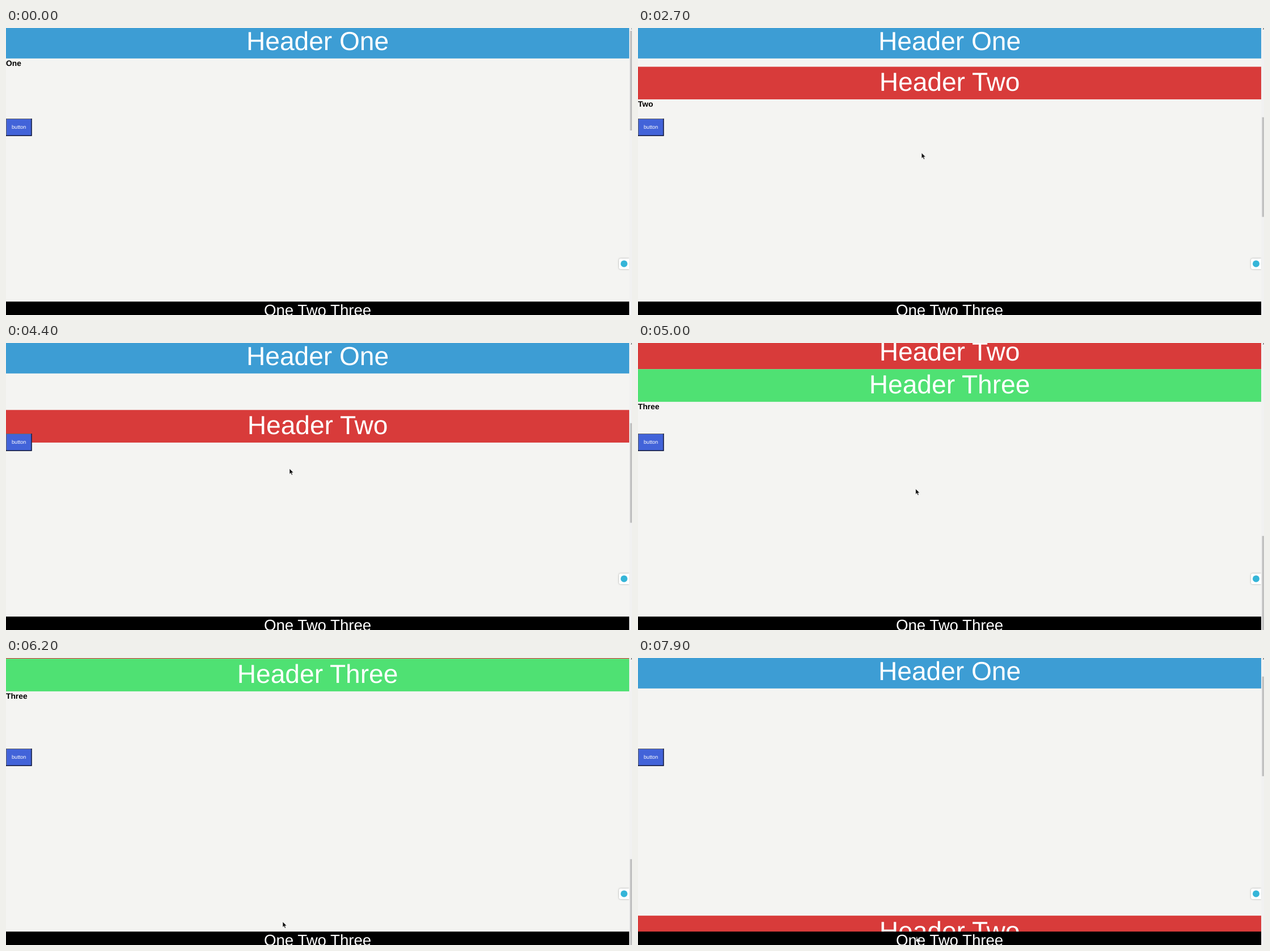
An HTML page for the animation above (8 s loop, 1104 by 507 pixels).

```html
<!DOCTYPE html>
<html lang="en">
<head>
<meta charset="utf-8">
<title>Sticky headers</title>
<style>
  html, body { margin: 0; width: 100%; height: 100%; overflow: hidden; background: #f4f4f2; }
  svg { display: block; width: 100%; height: 100%; }
  text { font-family: "Liberation Sans", Arial, sans-serif; text-rendering: geometricPrecision; }
  .head text { font-size: 46.1px; fill: #fff; text-anchor: middle; }
  .label { font-size: 13.8px; font-weight: bold; }
  #foot { font-size: 27.6px; fill: #fff; text-anchor: middle; }
  #widget { filter: drop-shadow(0 0 1.5px #0005); }
</style>
</head>
<body>
<svg viewBox="0 0 1104 507">
  <rect width="1104" height="507" fill="#f4f4f2"/>
  <g id="labels"></g>
  <g id="heads"></g>

  <g id="button">
    <rect y="160" width="45.6" height="30.8" fill="#4263d9"/>
    <path d="M.5 190.8V160.5H45.6" fill="none" stroke="#68686c" stroke-width="1.1"/>
    <path d="M0 190.2H45V160" fill="none" stroke="#0b0b18" stroke-width="1.2"/>
    <text x="22.7" y="178.2" font-size="9.2" fill="#fff" text-anchor="middle">button</text>
  </g>

  <path id="widget" d="M1099 407.3H1084a3 3 0 0 0-3 3V423a3 3 0 0 0 3 3H1099Z" fill="#fff"/>
  <circle cx="1090" cy="416.5" r="6" fill="#35b5d8"/>

  <rect y="483.3" width="1099.2" height="24" fill="#000"/>
  <text id="foot" x="549.6" y="508.3">One Two Three</text>

  <rect x="1099.2" width="5" height="507" fill="#f1f1f1"/>
  <rect id="thumb" x="1100.5" width="3.5" height="176" fill="#c1c1c1"/>
  <path id="arrow" d="M1101.5 2.3L1104 0V2.3Z"/>

  <path id="pointer" d="M0 0V9.5L2.2 7.6 3.8 11.2 5.4 10.5 3.9 7H7Z" fill="#111" stroke="#fff" stroke-width=".5"/>
  <path id="hand" d="M-.8 .4Q0-.6 .8 .4V3.6L5 4.3Q6 4.6 5.8 6L5 9.5H.6L-2.8 5.6Q-2.6 4.4-.8 5.4Z" fill="#fff" stroke="#111" stroke-width=".5"/>
</svg>
<script>
const LOOP = 8000, STEP = 100;
const TOP = -3.8, VIEW = 545, HEAD = 57.6;
const NOTCH = 69, END = 2 * VIEW;   // one wheel click, bottom of the page
const $ = id => document.getElementById(id);

const sections = [["One", "#3d9dd4"], ["Two", "#d83b3a"], ["Three", "#4fe173"]];
$("labels").innerHTML = sections.map(([name]) => `<text class="label" x="0">${name}</text>`).join("");
$("heads").innerHTML = sections.map(([name, color]) =>
  `<g class="head"><rect width="1099.2" height="${HEAD}" fill="${color}"/><text x="549.6" y="42.6">Header ${name}</text></g>`).join("");
const labels = [...$("labels").children], heads = [...$("heads").children];

// gestures: start, end, destination
const scrolls = [
  [1600, 1900, NOTCH],
  [2050, 2400, 2 * NOTCH],
  [2600, 2775, 10 * NOTCH],
  [3000, 3580, 9 * NOTCH],
  [3700, 4500, 6 * NOTCH],
  [4700, 5060, END],
  [5600, 5900, END - NOTCH],
  [5900, 6260, END],
  [7300, 8025, 0]
];
const mouseMoves = [
  [100, 200, 455, 496],
  [400, 900, 528, 290],
  [900, 1200, 500.5, 217],
  [2600, 2750, 500, 222],
  [4500, 5000, 489.7, 257.7],
  [5000, 5600, 488, 466],
  [6700, 7100, 491.8, 492.5]
];

const ease = u => u * u * (3 - 2 * u);

// value after easing through every gesture up to time t
function glide(moves, t, value, col = 2) {
  for (const move of moves) {
    const u = Math.min(Math.max((t - move[0]) / (move[1] - move[0]), 0), 1);
    value += (move[col] - value) * ease(u);
  }
  return value;
}

const place = (el, x, y) => el.setAttribute("transform", `translate(${x} ${y})`);
const show = (el, on) => el.setAttribute("visibility", on ? "visible" : "hidden");

function draw(now) {
  const t = Math.floor(now % LOOP / STEP) * STEP;
  const scroll = glide(scrolls, t, 0);
  const top = i => TOP + VIEW * i - scroll;

  // each header sticks until the next section pushes it out
  sections.forEach((_, i) => {
    place(labels[i], 0, top(i) + 70.4);
    place(heads[i], 0, Math.min(Math.max(TOP, top(i)), top(i + 1) - HEAD));
  });

  $("thumb").setAttribute("y", 5 + scroll * 176 / VIEW);
  $("arrow").setAttribute("fill", scroll ? "#505050" : "#a3a3a3");

  const x = glide(mouseMoves, t, 466), y = glide(mouseMoves, t, 496, 3);
  const overLink = y > 483;
  place($("pointer"), x, y);
  place($("hand"), x, y);
  show($("pointer"), t >= 100 && !overLink);
  show($("hand"), t >= 100 && overLink);
}

function tick() {
  draw(performance.now());
  requestAnimationFrame(tick);
}
tick();
</script>
</body>
</html>
```
